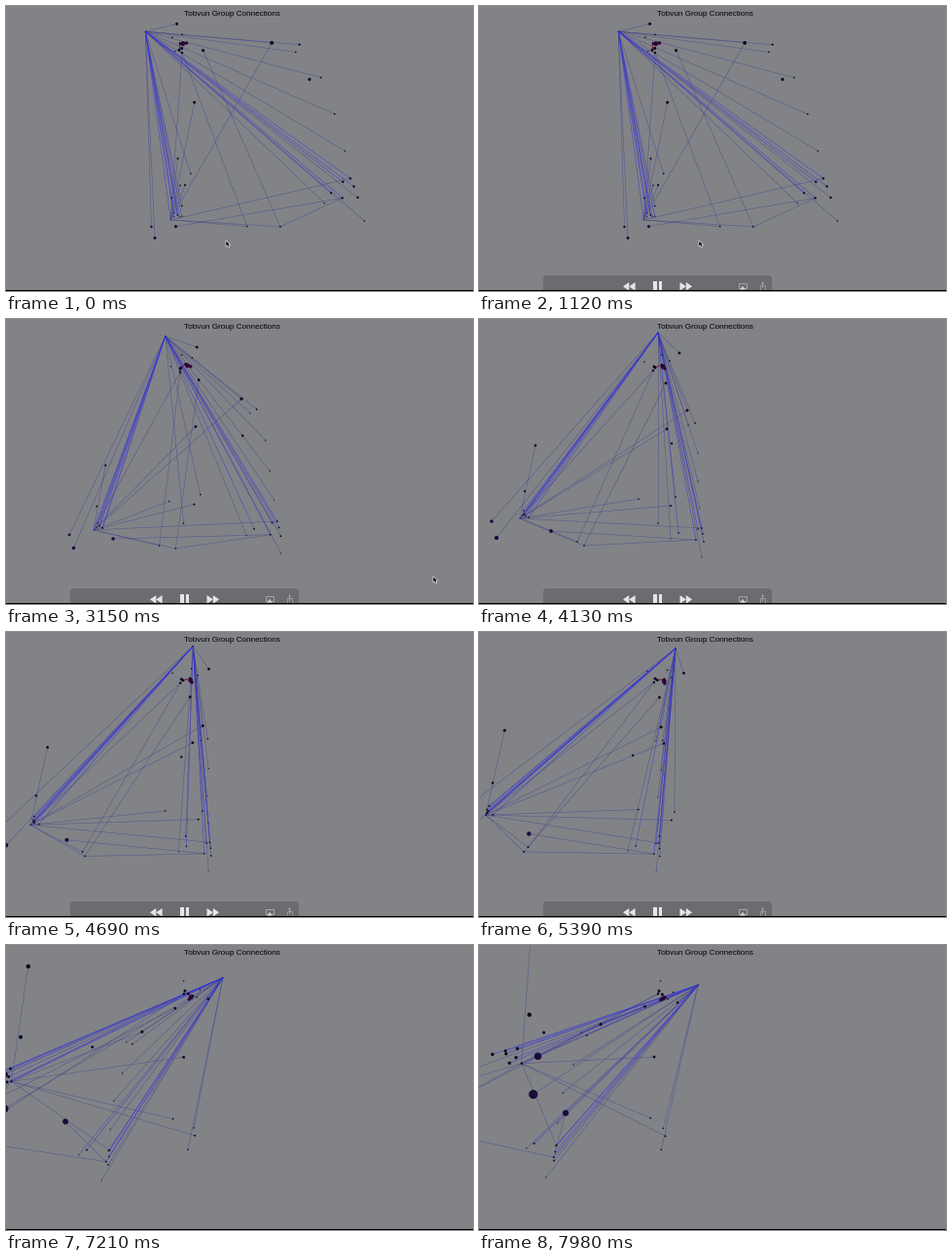
A matplotlib script that plays this animation: 480x293 px, repeating every 8 s.

```python
import numpy as np
import matplotlib.pyplot as plt
from matplotlib.animation import FuncAnimation
from matplotlib.collections import LineCollection
from matplotlib.patches import FancyBboxPatch, Polygon, Rectangle

W, H, DPI = 480, 293, 64
PX = 72 / DPI                 # points per pixel
LOOP, INTERVAL, STEP = 8000, 20, 70
AXIS_X, HORIZON = 184, 285    # turning axis and vanishing line on screen
PERSP = 0.003

# name: (x, y, depth, radius) as seen at turn angle 0
TOP = {
    'apex': (184, 14, .173, .6), 'a': (206, 35, .072, 1.4),
    'b': (196, 43, .034, .8), 'c': (188, 37, .064, .8),
    'd': (170, 44, .023, .7), 'g': (192, 66, -.07, 1.4),
    'h': (214, 94, -.33, 1.5), 'i': (222, 107, -.437, .8),
    'j': (215, 109, -.452, .6), 'k': (198, 128, -.635, 1.2),
    'l': (225, 138, -.61, .6), 'm': (225, 167, -.83, .6),
    'n': (227, 195, -1.14, .5), 'o': (193, 113, -.035, 1.4),
}
CORE = {
    'e1': (189, 49, .019, 2.4), 'e2': (191, 51, .006, 1.7),
    'e3': (188, 47, .030, 1.2), 'e4': (180, 49, .008, 1.5),
    'e5': (179, 53, .005, 1.2), 'e6': (181, 50, .022, 1.4),
}
LEFT = {
    'L': (42, 205, -.495, .6), 'r1': (46, 197, -.49, .8),
    'r2': (51, 204, -.60, .8), 'r3': (48, 203, -.65, .8),
    'r4': (45, 202, -.52, .8), 'r5': (47, 201, -.57, .8),
    'r6': (46, 200, -.56, .7), 'p': (58, 130, -.28, 1.3),
    'q': (47, 177, -.36, 1.1), 'near1': (74, 218, -.51, 1.9),
    'near2': (18, 225, -.40, 2.1), 'near3': (13, 208, -.26, 1.7),
    's': (101, 229, -1.88, .8), 't': (108, 233, -2.55, .8),
}
RIGHT = {
    'R': (223, 227, -1.79, .8), 'u1': (225, 216, -1.49, .8),
    'u2': (229, 215, -1.49, .8), 'u3': (230, 221, -1.65, .8),
    'u4': (231, 229, -1.91, .8), 'v': (205, 220, -1.68, .8),
    'w': (197, 226, -1.87, .5), 'far': (229, 245, -2.8, .5),
    'x1': (202, 183, .018, .8), 'x2': (197, 192, .058, 1),
    'x3': (164, 185, -.03, .8), 'x4': (184, 210, .045, .8),
}
NODES = {**TOP, **CORE, **LEFT, **RIGHT}
INDEX = {name: n for n, name in enumerate(NODES)}
NX, NY, NZ, NR = np.array(list(NODES.values())).T
NW = HORIZON - NY
NU = (NX - AXIS_X) / NW


def edges(text):
    """'hub: a b c; hub2: d' -> pairs of node indices."""
    pairs = []
    for part in text.split(';'):
        hub, ends = part.split(':')
        pairs += [(INDEX[hub.strip()], INDEX[e]) for e in ends.split()]
    return np.array(pairs)


STRONG = edges('apex: L r1 r2 r3 r4 r5 r6 R u1 u2 u3 v')
THIN = edges('apex: near2 near3 a h i j l m n u4 w far x1 x4;'
             'L: x2 x3 h o e5 p s t u2; R: near1 t; t: g; s: e5')
RED = edges('e1: e2 e3; e2: e3; e3: e6')

# time keys
TURN_T = [0, 1350, 1890, 2240, 3080, 3150, 3920, 4130, 5390, 6440, 7980]
TURN = [-67, -67, -47.5, -42, -27, -26, -7, 0, 22.8, 49.3, 77.8]
MOUSE_T = [1350, 1890, 2240, 3080]
MOUSE_X = [226, 328, 390, 439]
MOUSE_Y = [241, 262.5, 265, 264.5]
MOUSE_OFF = 3500


def project(t):
    turn = np.radians(np.interp(t, TURN_T, TURN))
    lift = np.interp(t, [1350, 1890], [-3, 0])
    zoom = np.interp(t, [1350, 1890], [1.025, 1])
    c, s = np.cos(turn), np.sin(turn)
    depth = NZ * c - NU * s
    w = zoom / (1 / NW - PERSP * (depth - NZ))
    x = AXIS_X + w * (NU * c + NZ * s)
    y = HORIZON + lift - w
    return np.column_stack([x, y]), NR * w / NW


fig = plt.figure(figsize=(W / DPI, H / DPI), dpi=DPI, facecolor='#828387')
ax = fig.add_axes([0, 0, 1, 1])
ax.set_xlim(0, W)
ax.set_ylim(H, 0)
ax.axis('off')


def lines(color, width, alpha, z):
    return ax.add_collection(LineCollection(
        [], colors=color, linewidths=width * PX, alpha=alpha, zorder=z))


webs = [(THIN, lines('#38388c', .55, .6, 1)),
        (STRONG, lines('#3434d8', .65, .65, 2)),
        (RED, lines('#7a1440', 1.1, .9, 3))]

tones = {'e1': '#2c0836', 'e2': '#2c0836', 'near1': '#1c0a3c',
         'near2': '#1c0a3c', 'near3': '#1c0a3c'}
dots = ax.scatter(NX, NY, c=[tones.get(n, '#08061c') for n in NODES],
                  linewidths=0, zorder=4)

ax.text(232.7, 10.5, 'Tobvun Group Connections', ha='center', va='baseline',
        family='Liberation Sans', size=8.1 * PX, color='black', zorder=6)

# player bar
bar = []


def part(patch, alpha=1.0):
    patch.set_zorder(7)
    ax.add_patch(patch)
    bar.append((patch, alpha))


def shape(points, color='#e6e6e8'):
    part(Polygon(points, closed=True, fc=color, lw=0))


part(FancyBboxPatch((66.5, 277.5), 234, 30,
                    boxstyle='round,pad=0,rounding_size=3',
                    fc='#6c6c70', ec='#646468', lw=.6 * PX))
for x in (148, 154.3):
    shape([(x, 288.3), (x + 6.3, 284), (x + 6.3, 292.6)])
for x in (206.5, 212.8):
    shape([(x, 284), (x + 6.3, 288.3), (x, 292.6)])
for x in (178.7, 184.6):
    part(Rectangle((x, 282.5), 3.8, 11, fc='#e6e6e8', lw=0))
part(Rectangle((267, 285), 8, 5.2, fc='none', ec='#b4b4b8', lw=.8 * PX))
shape([(271, 287.8), (268.2, 291.6), (273.8, 291.6)], '#d0d0d4')
part(Rectangle((289, 287), 5, 5, fc='none', ec='#a2a2a6', lw=.8 * PX))
part(Rectangle((291.1, 284.5), .8, 5, fc='#a2a2a6', lw=0))
shape([(291.5, 283), (289.9, 285.4), (293.1, 285.4)], '#a2a2a6')

ax.add_patch(Rectangle((0, 292), W, 1, fc='black', lw=0, zorder=9))

ARROW = 1.15 * np.array([(0, 0), (0, 5.6), (1.3, 4.5), (2.3, 6.6),
                         (3.3, 6.1), (2.4, 4.1), (4.1, 4.0)])
mouse = ax.add_patch(Polygon(ARROW, closed=True, fc='black', ec='#f0f0f0',
                             lw=.6 * PX, zorder=8))


def draw(n):
    t = (n * INTERVAL + INTERVAL // 2) // STEP * STEP
    pos, radius = project(t)
    for pairs, web in webs:
        web.set_segments(pos[pairs])
    dots.set_offsets(pos)
    dots.set_sizes((2 * radius * PX) ** 2)

    shown = np.interp(t, [70, 420, 6720, 7210], [0, 1, 1, 0])
    for patch, alpha in bar:
        patch.set_alpha(alpha * shown)

    tip = (np.interp(t, MOUSE_T, MOUSE_X), np.interp(t, MOUSE_T, MOUSE_Y))
    mouse.set_xy(ARROW + tip)
    mouse.set_visible(t < MOUSE_OFF)
    return []


anim = FuncAnimation(fig, draw, frames=LOOP // INTERVAL, interval=INTERVAL,
                     repeat=True, repeat_delay=0, blit=False)
plt.show()
```
